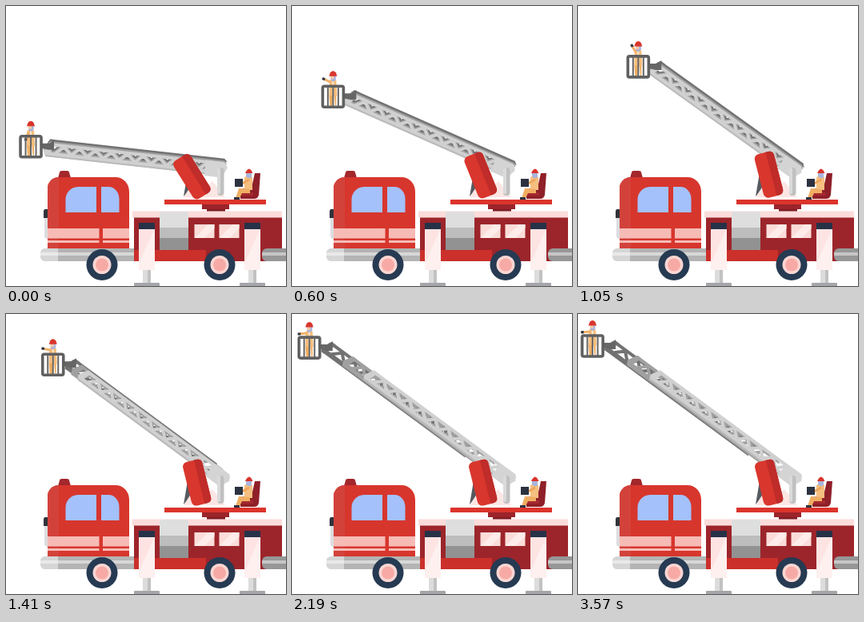
Write an HTML page that moves like this. It is 350x350 px and loops after 3.63 s.

```html
<!DOCTYPE html>
<html lang="en">
<head>
<meta charset="utf-8">
<title>Fire engine ladder</title>
<style>
html, body { margin: 0; width: 100%; height: 100%; overflow: hidden; background: #fff; }
svg { display: block; width: 100vw; height: 100vh; }
</style>
</head>
<body>
<svg viewBox="0 0 350 350">
  <defs>
    <g id="wheel">
      <circle r="19.5" fill="#263a52"/>
      <circle r="11.5" fill="#fbd6d3"/>
      <circle r="8" fill="#f7aaa5"/>
    </g>
    <g id="leg">
      <path d="M-5 328H5V347H-5Z" fill="#dcdcdc"/>
      <path d="M1 328H5V347H1Z" fill="#c2c2c2"/>
      <path d="M-10 278H10V330H-10Z" fill="#fde4e3"/>
      <path d="M10 278V330H-10V322Z" fill="#fdf0ef"/>
      <path d="M-10 271H10V279H-10Z" fill="#263247"/>
      <path d="M-16 350V347Q-16 346 -15 346H15Q16 346 16 347V350Z" fill="#a4a6aa"/>
    </g>
    <g id="pane">
      <path d="M0 0H25V17H0Z" fill="#fbdcd9"/>
      <path d="M0 17L17 0H25V5L13 17Z" fill="#fdecea"/>
    </g>
    <g id="beam">
      <path id="truss" fill="none" stroke="currentColor" stroke-width="4"/>
      <path d="M-214 -15.5H5L9 -11.5H-217Z" fill="currentColor"/>
      <path d="M-214 -15.5H-208L-214 2H-218L-221 -4Z" fill="currentColor"/>
      <path d="M-220 -4H5V2H-218Z" fill="currentColor"/>
    </g>
  </defs>

  <!-- ladder foot -->
  <path d="M222 238L228 203L234 225Z" fill="#555a60"/>
  <path d="M222 239L233 222L242 239Z" fill="#fce6e4"/>
  <path d="M236 239L258 219L274 239Z" fill="#fce6e4"/>

  <!-- three telescoping sections -->
  <g id="inner" color="#727272"><use href="#beam" y="-4.5"/></g>
  <g id="middle" color="#a0a0a0"><use href="#beam" y="-2"/></g>
  <g id="outer" color="#d0d0d0">
    <use href="#beam"/>
    <path d="M-218.500 0H4V2H-218Z" fill="#bababa"/>
    <path d="M-18 -15.500H5L10 -9L4 4H-18Z" fill="#d4d4d4"/>
  </g>

  <!-- basket, centred on its cage -->
  <g id="basket">
    <path d="M13 -4L23 -4L29 -8V4H22L13 2Z" fill="#666"/>
    <path d="M-5 -2H4V11H2.500L1.500 -1H0L-1 12H-4Z" fill="#f0ae62"/>
    <path d="M-4.500 -20Q0 -24 4 -20L5 -1H-5Z" fill="#f6bd7c"/>
    <path d="M-1 -19H1V-2H-1Z" fill="#fbe6cc"/>
    <path d="M-3 -26H3.500V-21Q0 -17 -3 -21Z" fill="#a9b5dc"/>
    <path d="M-3 -26H1V-22H-3Z" fill="#f5c7a6"/>
    <path d="M-5 -25.500L-3.500 -30Q0 -34 3.500 -30L5 -25.500Z" fill="#d9352c"/>
    <g id="arm">
      <path d="M0 0H-9" stroke="#f2b06a" stroke-width="3"/>
      <path d="M-8 0H-11.500" stroke="#30343c" stroke-width="3.2"/>
    </g>
    <rect x="-13" y="-13" width="26" height="26" rx="2" fill="none" stroke="#606060" stroke-width="3.6"/>
    <path d="M-6.500 -12V12M0 -12V12M6.500 -12V12" stroke="#666" stroke-width="2"/>
  </g>

  <rect x="264" y="202" width="8.500" height="35" rx="4" fill="#c0c0c0"/>
  <rect x="264" y="202" width="4" height="33" rx="2" fill="#dadada"/>
  <g id="ram">
    <rect x="-12.500" y="-50" width="25" height="56" rx="6" fill="#d9362d"/>
    <path d="M3 -50H6.500Q12.500 -50 12.500 -44V0Q12.500 6 6.500 6H3Z" fill="#bf2c2a"/>
  </g>

  <!-- operator -->
  <path d="M311 209H318L316 236Q315 241 310 241H293V229L307 227Z" fill="#8f2029"/>
  <path d="M292 233H309V237H292Z" fill="#a62a31"/>
  <path d="M298 214Q304 210 308 214V230H298Z" fill="#f6bf80"/>
  <path d="M305 229L291 228L287 240H292L295 234H305Z" fill="#f0ae62"/>
  <path d="M285 239H292V242H285Z" fill="#2c3240"/>
  <path d="M304 217L295 222" stroke="#eda55b" stroke-width="3"/>
  <path d="M300 209H307V214Q303 217 300 213Z" fill="#a9b5dc"/>
  <path d="M299 209L300.500 206Q304 201 307 206L308.500 209Z" fill="#d9352c"/>
  <path d="M286 216H296V226H286Z" fill="#2c3240"/>

  <!-- turntable and body -->
  <path d="M198 242H325V248H198Z" fill="#db342c"/>
  <path d="M245 248H279V254H245Z" fill="#9b242a"/>
  <path d="M251 254H274V257H251Z" fill="#7f1d25"/>
  <path d="M160 264H345V319H160Z" fill="#9c252b"/>
  <path d="M160 305H250V319H160Z" fill="#cb302b"/>
  <path d="M158 256.500H345V264.500H158Z" fill="#fbdcda"/>
  <path d="M192 257H228V277H192Z" fill="#dedede"/>
  <path d="M192 277H228V290H192Z" fill="#bdbdbd"/>
  <path d="M192 290H228V305H192Z" fill="#929292"/>
  <use href="#pane" x="235.500" y="273"/>
  <use href="#pane" x="266.500" y="273"/>
  <path d="M350 303H326A6 6 0 0 0 320 309V313A6 6 0 0 0 326 319H350Z" fill="#979797"/>
  <path d="M320 308H350V312H320Z" fill="#c6c6c6"/>

  <!-- cab -->
  <path d="M65 215L67 208Q67 206 70 206H76Q79 206 79 208L81 215Z" fill="#a3272b"/>
  <path d="M52 254H49Q47 254 47 257V265H52Z" fill="#30343c"/>
  <path d="M52 265H48V287Q48 291 52 291Z" fill="#dcdde0"/>
  <path d="M52 303V228A14 14 0 0 1 66 214H137A17 18 0 0 1 154 232V303Z" fill="#d7362d"/>
  <path d="M52 303V228A14 14 0 0 1 66 214V303Z" fill="#d2423b"/>
  <path d="M52 278H154V290.500H52ZM52 293H154V296H52Z" fill="#f7bbb6"/>
  <path d="M116.500 258H121V303H116.500Z" fill="#d7362d"/>
  <path d="M74.500 258V242A16 16 0 0 1 90 226H113V258Z" fill="#a4c1fb"/>
  <path d="M119 226H128A13.500 15 0 0 1 141.500 241V258H119Z" fill="#a4c1fb"/>
  <path d="M160 303H49A6 6 0 0 0 43 309V313A6 6 0 0 0 49 319H160Z" fill="#b4b4b4"/>
  <path d="M43 308H160V312H43Z" fill="#d8d8d8"/>
  <path d="M65 303H49A6 6 0 0 0 43 309V313A6 6 0 0 0 49 319H65Z" fill="#fff" opacity=".45"/>
  <use href="#leg" x="176"/>
  <use href="#leg" x="308"/>
  <use href="#wheel" x="120" y="323.500"/>
  <use href="#wheel" x="267" y="323.500"/>
</svg>
<script>
const LOOP = 3630;
const HINGE = { x: 266, y: 210 };
const PIN = { x: -215.5, y: -11.1 };
const SLOPE = 0.57;
const LIFT = [[0, 6.3], [240, 13.4], [600, 23.8], [1080, 36.4]];
const SLIDE = [[1080, 0], [1620, 30], [1800, 38.5], [2160, 54], [2270, 59]];
const WAVE = [[0, -70], [240, 8], [600, 25], [1050, 60], [1500, 0], [1800, -70],
  [2400, 30], [2730, -30], [2850, 5], [3050, 22], [3270, 8], [3570, -4]];
const SECTIONS = { outer: 0, middle: 0.5, inner: 1 };

const get = id => document.getElementById(id);
const place = (id, x, y, turn) =>
  get(id).setAttribute("transform", `translate(${x} ${y}) rotate(${turn})`);

// linear interpolation through [time, value] pairs
function along(keys, t) {
  if (t <= keys[0][0]) return keys[0][1];
  for (let i = 1; i < keys.length; i++) {
    const [t0, a] = keys[i - 1], [t1, b] = keys[i];
    if (t < t1) return a + (b - a) * (t - t0) / (t1 - t0);
  }
  return keys[keys.length - 1][1];
}

let zigzag = "";
for (let i = 0; i < 20; i++)
  zigzag += (i ? "L" : "M") + (-206 + i * 10) + " " + (i % 2 ? -12 : -3);
get("truss").setAttribute("d", zigzag);

function draw(t) {
  const lift = along(LIFT, t), out = along(SLIDE, t);
  const r = lift * Math.PI / 180, c = Math.cos(r), s = Math.sin(r);
  for (const [id, share] of Object.entries(SECTIONS))
    place(id, HINGE.x - out * share, HINGE.y - out * share * SLOPE, lift);
  place("basket",
    HINGE.x + PIN.x * c - PIN.y * s - out - 22,
    HINGE.y + PIN.x * s + PIN.y * c - out * SLOPE + 0.5, 0);
  place("arm", -3, -18, along(WAVE, t));
  place("ram", 244, 232, -32 + 18 * Math.min(t / 1080, 1));
}

const start = performance.now();
function tick() {
  draw((performance.now() - start) % LOOP);
  requestAnimationFrame(tick);
}
tick();
</script>
</body>
</html>
```
